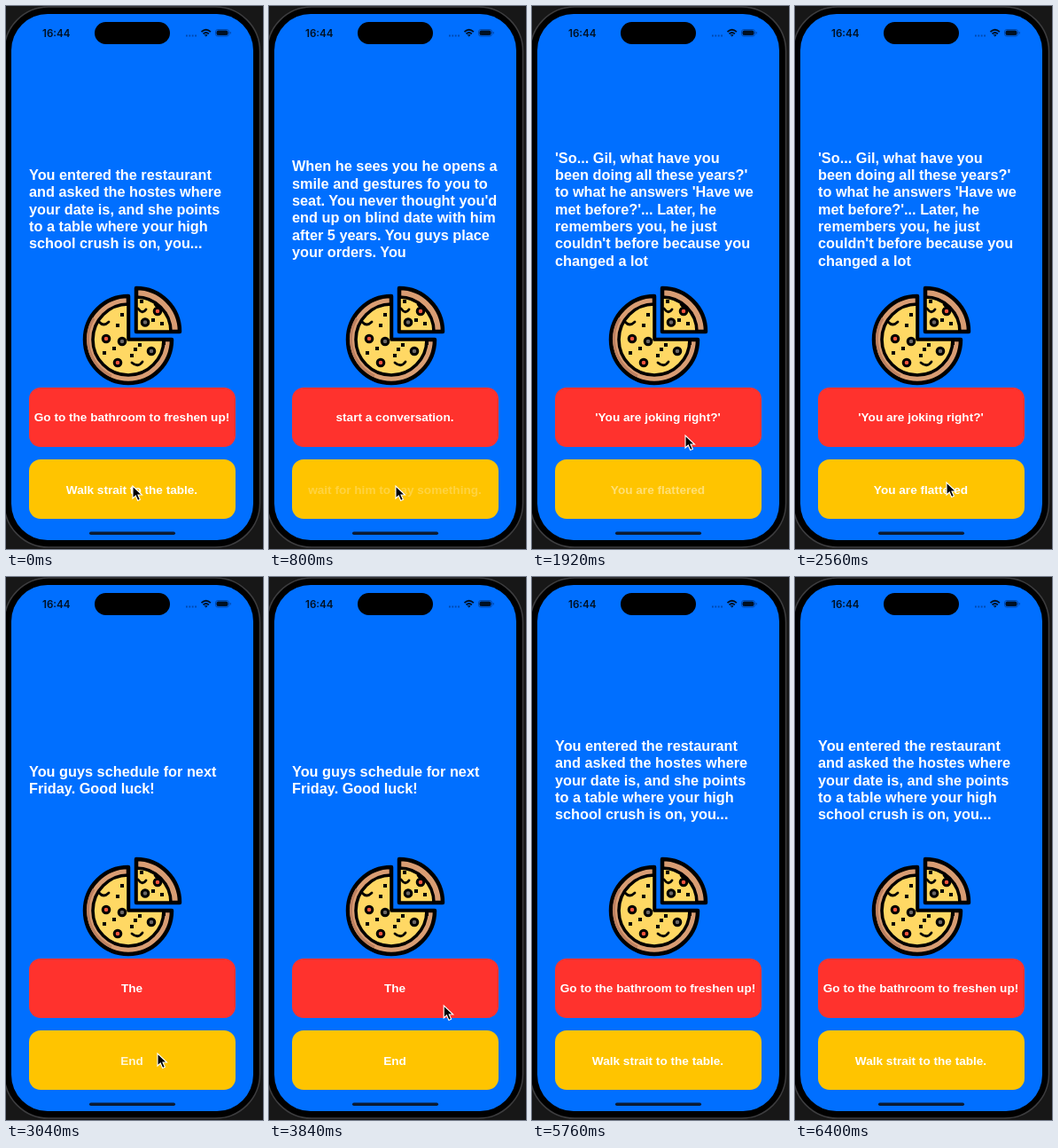
An HTML page for the animation above (6.48 s loop, 290x612 px).

```html
<!DOCTYPE html>
<html lang="en">
<head>
<meta charset="utf-8">
<style>
  html, body { margin: 0; width: 100%; height: 100%; overflow: hidden; background: #171717; }
  svg { display: block; width: 290px; height: 612px; }
  text { font-family: "Liberation Sans", Arial, sans-serif; font-weight: 700; fill: #fff; }
  #story { font-size: 16.3px; }
  .label { font-size: 13.6px; text-anchor: middle; }
  .clock { font: 600 11.6px Inter, sans-serif; fill: #001022; }
</style>
</head>
<body>
<svg viewBox="0 0 290 612">
  <rect x="-2" y="1" width="288.500" height="609" rx="50" fill="#000" stroke="#3d3d3f" stroke-width="1.500"/>
  <rect x="6" y="9" width="273" height="593" rx="41" fill="#006fff"/>
  <rect x="100" y="18" width="85" height="25" rx="12.500"/>

  <text class="clock" x="41" y="34.500">16:44</text>
  <path d="M203 33.500H215" stroke="#0048ad" stroke-width="1.800" stroke-dasharray="1.800 1.600"/>
  <g fill="none" stroke="#001022" stroke-width="1.800">
    <path d="M220.500 29.200Q225.700 24.300 230.900 29.200M222.500 31.400Q225.700 28.500 228.900 31.400"/>
    <path d="M224.300 32.700L225.700 34L227.100 32.700Z" stroke-width="1"/>
  </g>
  <rect x="236.500" y="26.500" width="15" height="7.600" rx="2.500" fill="none" stroke="#0048ad"/>
  <rect x="238" y="28" width="12" height="4.600" rx="1.300" fill="#001022" stroke="#001022"/>
  <path d="M253.200 29v2.500" stroke="#0048ad" stroke-width="1.200"/>

  <text id="story"></text>

  <g stroke="#000" stroke-width="4.500" stroke-linejoin="round">
    <path d="M138 376V327A49 49 0 1 0 187 376Z" fill="#d99d73"/>
    <path d="M138 376V336A40 40 0 1 0 178 376Z" fill="#ffd864" stroke-width="3.600"/>
    <path d="M147 367V318A49 49 0 0 1 196 367Z" fill="#d99d73"/>
    <path d="M147 367V328A39 39 0 0 1 186 367Z" fill="#ffd864" stroke-width="3.600"/>
    <path d="M99 352A46 46 0 0 0 119 417" fill="none" stroke="#bd8060" stroke-width="3"/>
    <path d="M105 356Q110 362 116 356M142 402Q149 408 154 401M149 341Q154 348 158 342M168 336Q171 341 175 341"
      fill="none" stroke-width="2.800" stroke-linecap="round"/>
  </g>
  <g id="toppings" stroke="#000" stroke-width="3"></g>
  <path id="crumbs" stroke="#000" stroke-width="4"/>

  <rect x="26" y="430" width="233" height="67" rx="13" fill="#ff322d"/>
  <rect x="26" y="511" width="233" height="67" rx="13" fill="#ffc400"/>
  <text class="label" id="first" x="142" y="468"></text>
  <text class="label" id="second" x="142" y="549.500"></text>
  <rect x="94" y="592.500" width="97" height="3.500" rx="1.750" fill="#0b1b33"/>

  <path id="cursor" d="M0 0V14L3.300 11L5.700 16.500L8.400 15.300L6 10H10.500Z" stroke="#fff" stroke-width="1.100"/>
</svg>
<script>
const LOOP = 6480, STEP = 80, FADE_OUT = 160, FADE_IN = 240;
const $ = id => document.getElementById(id);

const scenes = [
  { story: "You entered the restaurant|and asked the hostes where|your date is, and she points|to a table where your high|school crush is on, you...",
    first: "Go to the bathroom to freshen up!", second: "Walk strait to the table." },
  { story: "When he sees you he opens a|smile and gestures fo you to|seat. You never thought you'd|end up on blind date with him|after 5 years. You guys place|your orders. You",
    first: "start a conversation.", second: "wait for him to say something." },
  { story: "'So... Gil, what have you|been doing all these years?'|to what he answers 'Have we|met before?'... Later, he|remembers you, he just|couldn't before because you|changed a lot",
    first: "'You are joking right?'", second: "You are flattered" },
  { story: "You guys schedule for next|Friday. Good luck!", first: "The", second: "End" }
];
const taps = [-LOOP, 580, 1650, 2676, 4616];
// time, x, y
const cursorPath = [
  [0, 143, 541], [850, 143, 541], [1450, 173, 484], [2050, 173, 484], [2550, 171, 537],
  [3150, 171, 537], [4150, 205, 467], [4720, 205, 467], [5360, 215, 614], [LOOP, 215, 614]
];

$("toppings").innerHTML = [[113, 375, 1], [131, 378], [126, 402, 1], [164, 389], [157, 356.5], [171, 344, 1]]
  .map(([x, y, red]) => `<circle cx="${x}" cy="${y}" r="3.800" fill="${red ? "#f2553d" : "#6b6664"}"/>`).join("");
$("crumbs").setAttribute("d", [[131, 348], [126, 360], [122, 386], [111, 391], [146, 387], [151, 382], [142, 394], [178, 380], [166, 354], [176, 358], [153, 333]]
  .map(([x, y]) => `M${x - 2} ${y}h4`).join(""));

let shown = -1;
function showScene(index) {
  if (index === shown) return;
  shown = index;
  const { story, first } = scenes[index], lines = story.split("|");
  $("story").innerHTML = lines.map((line, i) =>
    `<tspan x="26" y="${234.7 + (i - (lines.length - 1) / 2) * 19.35}">${line}</tspan>`).join("");
  $("first").textContent = first;
}

function moveCursor(t) {
  const i = cursorPath.findIndex(p => p[0] > t);
  const [t0, x0, y0] = cursorPath[i - 1], [t1, x1, y1] = cursorPath[i];
  const u = (t - t0) / (t1 - t0), k = u * u * (3 - 2 * u);
  $("cursor").setAttribute("transform", `translate(${x0 + (x1 - x0) * k} ${y0 + (y1 - y0) * k})`);
}

function draw() {
  const t = Math.floor(performance.now() % LOOP / STEP) * STEP;
  const step = taps.filter(tap => tap <= t).length - 1;
  const since = t - taps[step], leaving = since < FADE_OUT;
  showScene(step % scenes.length);
  $("second").textContent = scenes[(leaving ? step - 1 : step) % scenes.length].second;
  $("second").style.opacity = leaving ? 1 - since / FADE_OUT : Math.min(1, (since - FADE_OUT) / FADE_IN);
  moveCursor(t);
  requestAnimationFrame(draw);
}
draw();
</script>
</body>
</html>
```
